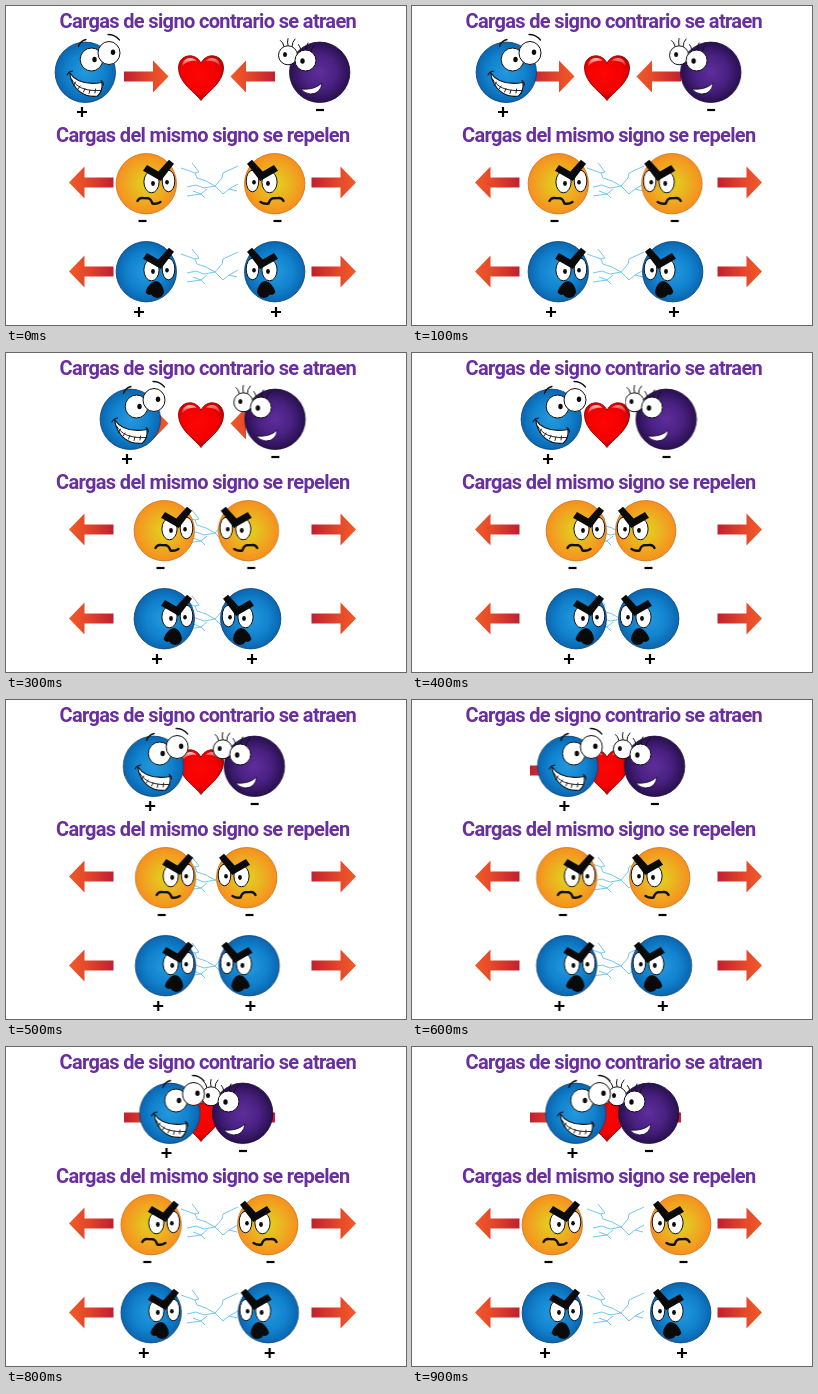
Write an HTML page that moves like this. It is 400x319 px and loops after 1 s.

```html
<!DOCTYPE html>
<html lang="es">
<head>
<meta charset="utf-8">
<title>Cargas</title>
<style>
  html, body { margin: 0; width: 100%; height: 100%; overflow: hidden; background: #fff; }
  svg { display: block; width: 100%; height: 100%; }
  text { font: 700 20px Roboto, Arial, sans-serif; letter-spacing: -.655px; fill: #6a2f9e; text-anchor: middle; }
  .line { fill: none; stroke: #111; stroke-linecap: round; stroke-linejoin: round; }
  .eye { fill: #fff; stroke: #111; stroke-width: 1; }
  .ink { fill: #0a0a0a; stroke: none; }
  .sign { fill: none; stroke: #000; stroke-width: 2.2; }
  .bolt { fill: none; stroke: #74c8f2; stroke-width: 1; stroke-linejoin: round; }

  .attract { animation: attract 1s infinite; }
  .repel { animation: repel 1s infinite; }
  @keyframes attract {
    0% { transform: translateX(0); animation-timing-function: steps(4, end); }
    40% { transform: translateX(var(--near)); animation-timing-function: steps(3, end); }
    70%, 100% { transform: translateX(var(--end)); }
  }
  @keyframes repel {
    0% { transform: translateX(0); animation-timing-function: steps(4, end); }
    40% { transform: translateX(var(--near)); animation-timing-function: steps(5, end); }
    90%, 100% { transform: translateX(0); }
  }
</style>
</head>
<body>
<svg viewBox="0 0 400 319" preserveAspectRatio="none">
  <defs>
    <radialGradient id="blue">
      <stop offset="0" stop-color="#2499de"/>
      <stop offset=".6" stop-color="#1283cf"/>
      <stop offset="1" stop-color="#0a66b0"/>
    </radialGradient>
    <radialGradient id="violet">
      <stop offset="0" stop-color="#5f2d9b"/>
      <stop offset=".55" stop-color="#4a2183"/>
      <stop offset="1" stop-color="#29104f"/>
    </radialGradient>
    <radialGradient id="gold">
      <stop offset="0" stop-color="#e2d41c"/>
      <stop offset=".5" stop-color="#ebb321"/>
      <stop offset="1" stop-color="#f78f1e"/>
    </radialGradient>
    <radialGradient id="red" cx=".45" cy=".42" r=".62">
      <stop offset="0" stop-color="#ff0505"/>
      <stop offset=".65" stop-color="#f30000"/>
      <stop offset="1" stop-color="#b80000"/>
    </radialGradient>
    <linearGradient id="gloss" x2="0" y2="1">
      <stop offset="0" stop-color="#fff" stop-opacity=".8"/>
      <stop offset="1" stop-color="#fff" stop-opacity="0"/>
    </linearGradient>
    <linearGradient id="flame">
      <stop offset="0" stop-color="#c1202f"/>
      <stop offset=".65" stop-color="#e64a2a"/>
      <stop offset="1" stop-color="#f05a28"/>
    </linearGradient>

    <path id="arrow" d="M0-5H29V-16L44.5 0L29 16V5H0Z" fill="url(#flame)"/>
    <path id="plus" class="sign" d="M-5 0H5M0-5V5"/>
    <path id="minus" class="sign" d="M-4 0H4"/>

    <g id="angry">
      <circle cx="140.3" cy="177.7" r="30.2" stroke-width=".8"/>
      <ellipse class="eye" cx="145.5" cy="176" rx="7.6" ry="10.8"/>
      <ellipse class="eye" cx="162.5" cy="175" rx="6.3" ry="10.8"/>
      <ellipse class="ink" cx="147" cy="177.5" rx="1.9" ry="2.4"/>
      <ellipse class="ink" cx="161" cy="176.3" rx="1.8" ry="2.3"/>
      <path class="ink" d="M137 164.8L141 159L152.3 165.5L163 153.8L168 157.8L154.8 175Z"/>
    </g>

    <g id="bolts" class="bolt">
      <path d="M175 162L189 167L191 172L200 175L209 180"/>
      <path d="M186 157L193 166L189 167"/>
      <path d="M232 160L217 167L216 172L209 180"/>
      <path d="M181 181L190 179L198 182L209 180L217 188L223 183L232 178"/>
      <path d="M181 190L195 188L201 183M187 185L195 188L199 192M223 183L231 185"/>
    </g>
  </defs>

  <text x="201.800" y="22">Cargas de signo contrario se atraen</text>
  <text x="196.800" y="136">Cargas del mismo signo se repelen</text>

  <use href="#arrow" x="118" y="70.500"/>
  <use href="#arrow" transform="translate(269 70.500) scale(-1 1)"/>
  <use href="#arrow" transform="translate(107.500 176.500) scale(-1 1)"/>
  <use href="#arrow" x="305.500" y="176.500"/>
  <use href="#arrow" transform="translate(107.500 265.500) scale(-1 1)"/>
  <use href="#arrow" x="305.500" y="265.500"/>

  <path d="M195 94.500C190 87 172.500 77 172.500 62C172.500 48 190 45.500 195 57.500C200 45.500 217.500 48 217.500 62C217.500 77 200 87 195 94.500Z" fill="url(#red)" stroke="#8a0508" stroke-width=".9"/>
  <path d="M176 61C176 52 186 49.500 190.500 55C185 54 179 56 176 61Z" fill="url(#gloss)"/>
  <path d="M200 55C204 49.500 214 52 214 61C211 56 206 54 200 55Z" fill="url(#gloss)" opacity=".7"/>

  <use href="#bolts"/>
  <use href="#bolts" y="86"/>

  <g class="attract" style="--near:-59.500px;--end:-77px">
    <circle cx="313.700" cy="66.300" r="30.200" fill="url(#violet)" stroke="#1c0b3a" stroke-width=".8"/>
    <path class="line" stroke-width="1" d="M278 40.500Q277 36 274.500 34.500M282 39.500Q281 36 282 32.500M286 40.500Q286 36 289 33M295 44.500Q294 40 292.500 38.500M300 44Q300 40 302 37M305 45.500Q305.500 41 309 39"/>
    <ellipse class="eye" cx="282" cy="49.300" rx="9.500" ry="9.500"/>
    <ellipse class="eye" cx="299.500" cy="54.500" rx="10.500" ry="10.500"/>
    <ellipse class="ink" cx="279" cy="48.500" rx="2" ry="2.500"/>
    <ellipse class="ink" cx="296.500" cy="55" rx="2.200" ry="2.700"/>
    <path d="M295 83Q308 84.500 316 77Q314.500 88 304.500 88Q298.500 87.500 295 83Z" fill="#fff" stroke="#150828" stroke-width=".8"/>
    <use href="#minus" x="314" y="104"/>
  </g>

  <g class="attract" style="--near:60px;--end:84.500px">
    <circle cx="79.300" cy="66.300" r="30.200" fill="url(#blue)" stroke="#0b3f73" stroke-width=".8"/>
    <path class="line" stroke-width="1.300" d="M72.500 40.500Q74 35 80 33.500M102 28.500Q109 28.500 113.500 34"/>
    <ellipse class="eye" cx="85.500" cy="53.500" rx="11.300" ry="11.500"/>
    <ellipse class="eye" cx="103" cy="47" rx="11" ry="11.500"/>
    <ellipse class="ink" cx="88.500" cy="53.500" rx="2.200" ry="2.700"/>
    <ellipse class="ink" cx="107" cy="46.300" rx="2.200" ry="2.700"/>
    <path d="M63.500 66.500C68 73.500 78 79.500 96 76.500C96.500 82 95 87 91.500 90C79 92 66 84 63.500 66.500Z" fill="#fff" stroke="#111" stroke-width="1.100"/>
    <path class="line" stroke-width=".9" d="M65.500 73C70 81 79 85.500 94.500 84.500M69.500 76L67.500 79.500M74 80L72 83M79 82.500L77.500 86M84 84L83 87.500M89.500 83L89 87"/>
    <path class="line" stroke-width="1.100" d="M61 69Q62.500 65.500 66.500 65M95 74.500Q97.500 76 97.500 79"/>
    <use href="#plus" x="76" y="106"/>
  </g>

  <g class="repel" style="--near:24px">
    <g id="sulk">
      <use href="#angry" fill="url(#gold)" stroke="#c9741a"/>
      <path class="line" stroke-width="2.400" d="M131.500 195Q133 191.500 137 192L142.500 192.300Q145 193 146.500 197.500Q150.500 198.500 154.500 196"/>
    </g>
    <use href="#minus" x="136.500" y="215"/>
  </g>
  <g class="repel" style="--near:-35px">
    <use href="#sulk" transform="translate(409) scale(-1 1)"/>
    <use href="#minus" x="271.500" y="215"/>
  </g>

  <g class="repel" style="--near:24px">
    <g id="shout">
      <use href="#angry" y="88" fill="url(#blue)" stroke="#0b3f73"/>
      <path class="ink" d="M139.500 286Q143 276 150 275Q156.500 276 158 286Q157 291.500 151 292Q147 291.500 145 288.500Q141.500 290 139.500 286Z"/>
    </g>
    <use href="#plus" x="133" y="306"/>
  </g>
  <g class="repel" style="--near:-32px">
    <use href="#shout" transform="translate(409) scale(-1 1)"/>
    <use href="#plus" x="270" y="306"/>
  </g>
</svg>
</body>
</html>
```
